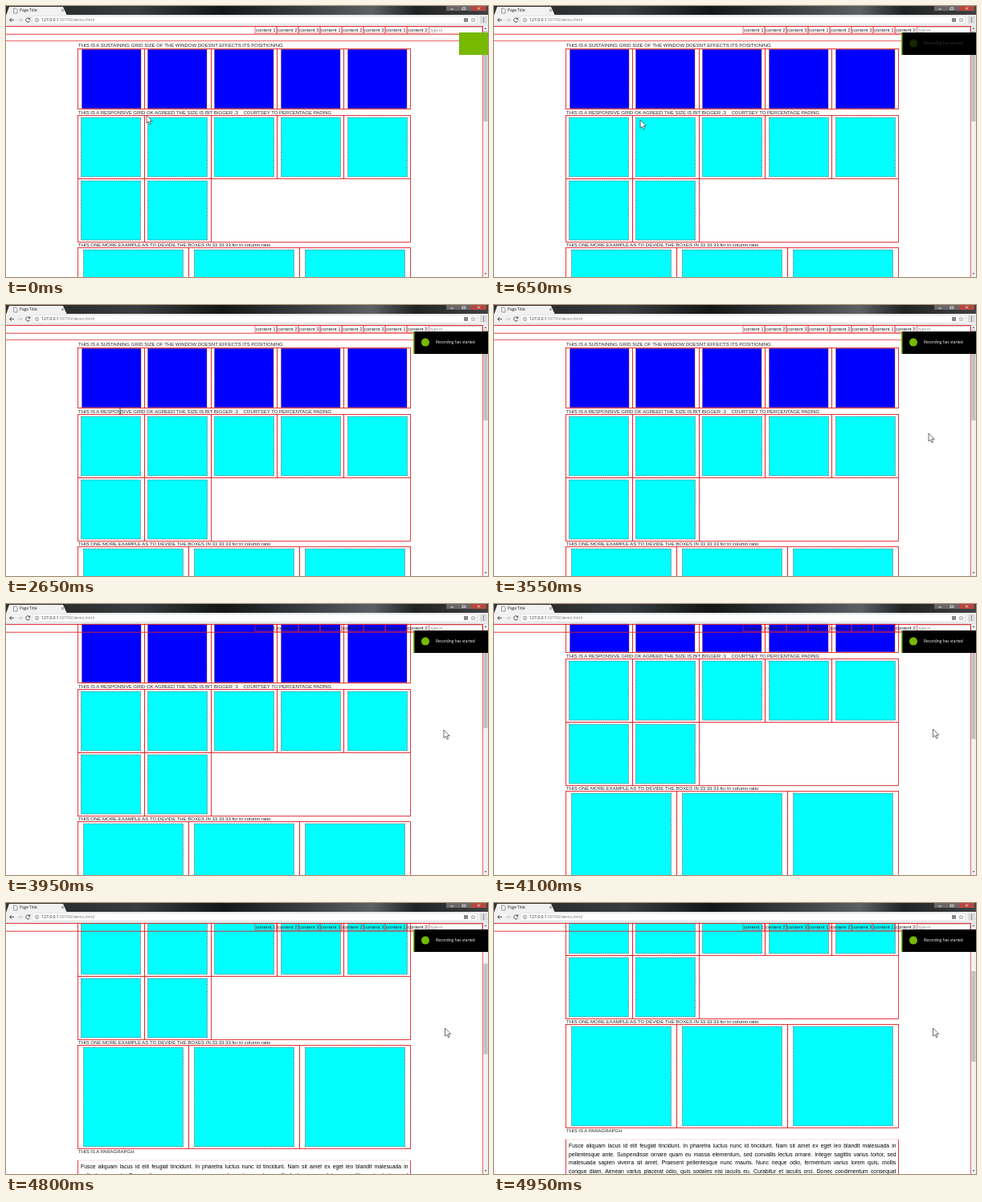
An HTML page that plays this animation: 600x338 px, repeating every 5000 ms.

```html
<!DOCTYPE html>
<html>
<head>
<meta charset="utf-8">
<style>
html, body { margin: 0; width: 100%; height: 100%; overflow: hidden; background: #fff; }
svg { display: block; width: 600px; height: 338px; }
text { white-space: pre; }
.arial { font-family: "Liberation Sans", Arial, sans-serif; }
.ui { font-family: "Open Sans", sans-serif; }
.para { font: 6.85px/10.6px "Liberation Sans", Arial, sans-serif; color: #000; }
.para div { white-space: nowrap; text-align: justify; text-align-last: justify; }
</style>
</head>
<body>
<svg id="stage" viewBox="0 0 600 338"></svg>
<script>
const RED = '#e3232b', BLUE = '#0000fe', CYAN = '#00ffff', GREEN = '#76b900';

const rect = (x, y, w, h, fill, extra = '') =>
  `<rect x="${x}" y="${y}" width="${w}" height="${h}" fill="${fill}" ${extra}/>`;
const frame = (x, y, w, h, width = 1) =>
  rect(x, y, w, h, 'none', `stroke="${RED}" stroke-width="${width}"`);
const line = (d, color, width = 1, extra = '') =>
  `<path d="${d}" fill="none" stroke="${color}" stroke-width="${width}" ${extra}/>`;
const text = (x, y, str, size = 6, fill = '#222', cls = 'arial') =>
  `<text x="${x}" y="${y}" font-size="${size}" fill="${fill}" class="${cls}">${str}</text>`;

// One row of bordered cells, each holding a centred square.
function row(y, height, count, columns, color, size = height - 5) {
  const cell = 414 / columns;
  const edge = i => Math.round(90 + i * cell) - .5;
  let out = '';
  for (let i = 0; i < count; i++) {
    const x = Math.round(90 + i * cell + (cell - size) / 2) - .5;
    out += frame(edge(i), y, edge(i + 1) - edge(i), height, .9) +
      rect(x, y + (height - size) / 2, size, size, color,
        'stroke="#803840" stroke-opacity=".7" stroke-width=".8" stroke-dasharray="2 .7"');
  }
  return out;
}

const paragraph = [
  'Fusce aliquam lacus id elit feugiat tincidunt. In pharetra luctus nunc id tincidunt. Nam sit amet ex eget leo blandit malesuada in',
  'pellentesque ante. Suspendisse ornare quam eu massa elementum, sed convallis lectus ornare. Integer sagittis varius tortor, sed',
  'malesuada sapien viverra sit amet. Praesent pellentesque nunc mauris. Nunc neque odio, fermentum varius lorem quis, mollis',
  'congue diam. Aenean varius placerat odio, quis sodales nisi iaculis eu. Curabitur et iaculis orci. Donec condimentum consequat'
];

const page =
  line('M0 43.5H593.5V700', RED, .7) +
  text(90, 51, 'THIS IS A SUSTAINING GRID SIZE OF THE WINDOW DOESNT EFFECTS ITS POSITIONING') +
  row(53.5, 75, 5, 5, BLUE, 73.5) +
  text(90, 134.5, 'THIS IS A RESPONSIVE GRID OK AGREED THE SIZE IS BIT BIGGER :3    COURTSEY TO PERCENTAGE PADING') +
  row(136.5, 79, 5, 5, CYAN) + row(215.5, 79, 2, 5, CYAN) +
  line('M255.5 294.5H503.5V215.5', RED, .9) +
  text(90, 300, 'THIS ONE MORE EXAMPLE AS TO DEVIDE THE BOXES IN 33 33 33 for tri column ratio') +
  row(301.5, 129, 3, 3, CYAN) +
  text(90, 436, 'THIS IS A PARAGRAPGH') +
  line('M89.5 700V445M503.5 700V445', RED, .9) + line('M90 445H504', '#f3c4c4', .6) +
  `<foreignObject x="93" y="448.1" width="407.5" height="60"><div xmlns="http://www.w3.org/1999/xhtml" class="para">${
    paragraph.map(p => `<div>${p}</div>`).join('')}</div></foreignObject>`;

let nav = rect(527.5, 26.5, 65, 7.5, '#fff', 'stroke="#c9a9a9" stroke-width=".6"') +
  text(528.5, 32, 'type in', 5, '#888') + frame(-1, 25.5, 594.5, 9.7, .9);
for (let i = 0; i < 8; i++) {
  const x = 310 + i * 27;
  nav += frame(x, 25.5, 27, 8.5, .6) + text(x + 1, 32, 'content ' + (i % 3 + 1));
}

const browser =
  rect(0, 0, 600, 12, 'url(#glass)') +
  '<path d="M0 12L4 1H71L76 12Z" fill="#f1f1f1"/>' +
  line('M9.5 3H12.5L14 4.5V9H9.5Z', '#777', .7) +
  text(17, 7.2, 'Page Title', 4.8, '#222', 'ui') + line('M69 4L72 7M72 4L69 7', '#555', .7) +
  rect(548, 0, 31, 6, '#6b6668') + rect(579, 0, 19, 6, '#b8483f') +
  line('M553 4H557M568 2H572V4.5H568ZM587 1.5L590 4.5M590 1.5L587 4.5', '#eee', .8) +
  rect(0, 11, 600, 13.5, '#f1f1f1') + rect(33, 12.5, 553, 9.5, '#fff', 'rx="1" stroke="#ccc" stroke-width=".5"') +
  line('M10 17.5H4.5L7 15M4.5 17.5L7 20', '#444', .9) +
  line('M14.5 17.5H20L17.5 15M20 17.5L17.5 20', '#c4c4c4', .9) +
  line('M29.5 16A2.6 2.6 0 1 0 29.7 18.5M29.8 14.5V16.5H27.8', '#444', .9) +
  '<circle cx="38.5" cy="17.5" r="2.3" fill="none" stroke="#777" stroke-width=".7"/>' + line('M38.5 16V19', '#777', .7) +
  text(44, 19.2, '127.0.0.1<tspan fill="#777">:59790/demo.html</tspan>', 5.15, '#222', 'ui') +
  rect(570, 15, 5, 5, '#888') +
  line('M581.5 14.8L582.3 16.7H584.2L582.7 17.9L583.3 19.9L581.5 18.7L579.7 19.9L580.3 17.9L578.8 16.7H580.7Z', '#777', .6) +
  rect(590, 12.5, 9, 9.5, '#dcdcdc') + line('M594.5 14.5V20.5', '#555', 1.2, 'stroke-dasharray="1.2 1.2"') +
  line('M0 24.2H600', '#c8c8c8', .6);

const stage = document.getElementById('stage');
stage.innerHTML = `
  <defs>
    <linearGradient id="glass">
      <stop offset="0" stop-color="#333"/><stop offset=".14" stop-color="#2c2e30"/>
      <stop offset=".27" stop-color="#3a3d3f"/><stop offset=".45" stop-color="#141617"/>
      <stop offset=".63" stop-color="#3c4042"/><stop offset=".76" stop-color="#5c6063"/>
      <stop offset=".85" stop-color="#202223"/><stop offset="1" stop-color="#404244"/>
    </linearGradient>
    <clipPath id="view">${rect(0, 24.5, 594, 314, '#000')}</clipPath>
  </defs>
  <g clip-path="url(#view)"><g id="page">${page}</g></g>
  ${nav}
  ${rect(594, 24.5, 6, 314, '#f1f1f1')}
  <path d="M595.5 29L597 27L598.5 29ZM595.5 333L597 335L598.5 333Z" fill="#666"/>
  ${rect(594.5, 31, 5, 113, '#c1c1c1', 'id="thumb"')}
  ${browser}
  ${rect(507, 33, 93, 28, GREEN, 'id="green"')}
  ${rect(508.5, 33, 93, 28, '#000', 'id="black"')}
  <g id="notice"><circle cx="522" cy="46.6" r="5" fill="${GREEN}"/>${
    text(535, 48.3, 'Recording has started', 4.8, '#fff', 'ui')}</g>
  <path id="arrow" d="M0 0V10L2.3 8L4 11.7L5.6 11L4 7.4H7.2Z" fill="#fff" stroke="#333" stroke-width=".7"/>
  <path id="beam" d="M-1.5 -4H1.5M0 -4V4M-1.5 4H1.5" fill="none" stroke="#333" stroke-width=".8"/>`;

const [pageEl, thumb, green, black, notice, arrow, beam] =
  ['page', 'thumb', 'green', 'black', 'notice', 'arrow', 'beam'].map(id => document.getElementById(id));

const clamp = v => Math.max(0, Math.min(1, v));
const easeOut = p => 1 - (1 - clamp(p)) ** 2;
const move = (el, x, y) => el.setAttribute('transform', `translate(${x} ${y})`);

// Pointer stops: time, x, y
const stops = [
  [0, 175, 136], [600, 175, 138], [1100, 246, 180], [1150, 252, 200], [1600, 252, 200], [1650, 281, 104],
  [1750, 281, 104], [2150, 215, 118], [2650, 142, 132], [2750, 142, 132], [3250, 500, 152], [3550, 541, 160],
  [4100, 546.5, 156], [5000, 546.5, 156]
];
const wheelTicks = [3850, 4000, 4489, 4770];

function pointerAt(t) {
  const i = stops.findIndex(s => s[0] > t);
  const [t0, x0, y0] = stops[i - 1], [t1, x1, y1] = stops[i];
  const p = (t - t0) / (t1 - t0);
  return [x0 + (x1 - x0) * p, y0 + (y1 - y0) * p];
}

function draw(now) {
  const t = Math.floor(now % 5000 / 50) * 50;
  const scroll = Math.round(wheelTicks.reduce((sum, tick) => sum + 37.5 * easeOut((t - tick) / 180), 0));
  move(pageEl, 0, -scroll);
  move(thumb, 0, scroll * .36);

  move(green, 57 * (1 - easeOut(t / 150)), 0);
  move(black, 93 * (1 - easeOut((t - 200) / 300)), 0);
  notice.setAttribute('opacity', clamp((t - 550) / 500));

  const [x, y] = pointerAt(t);
  const overText = x < 407 && y > 128 && y < 135;
  move(arrow, x, y);
  move(beam, x, y);
  arrow.style.display = overText ? 'none' : '';
  beam.style.display = overText ? '' : 'none';
}

const start = performance.now();
function tick() {
  draw(performance.now() - start);
  requestAnimationFrame(tick);
}
tick();
</script>
</body>
</html>
```
